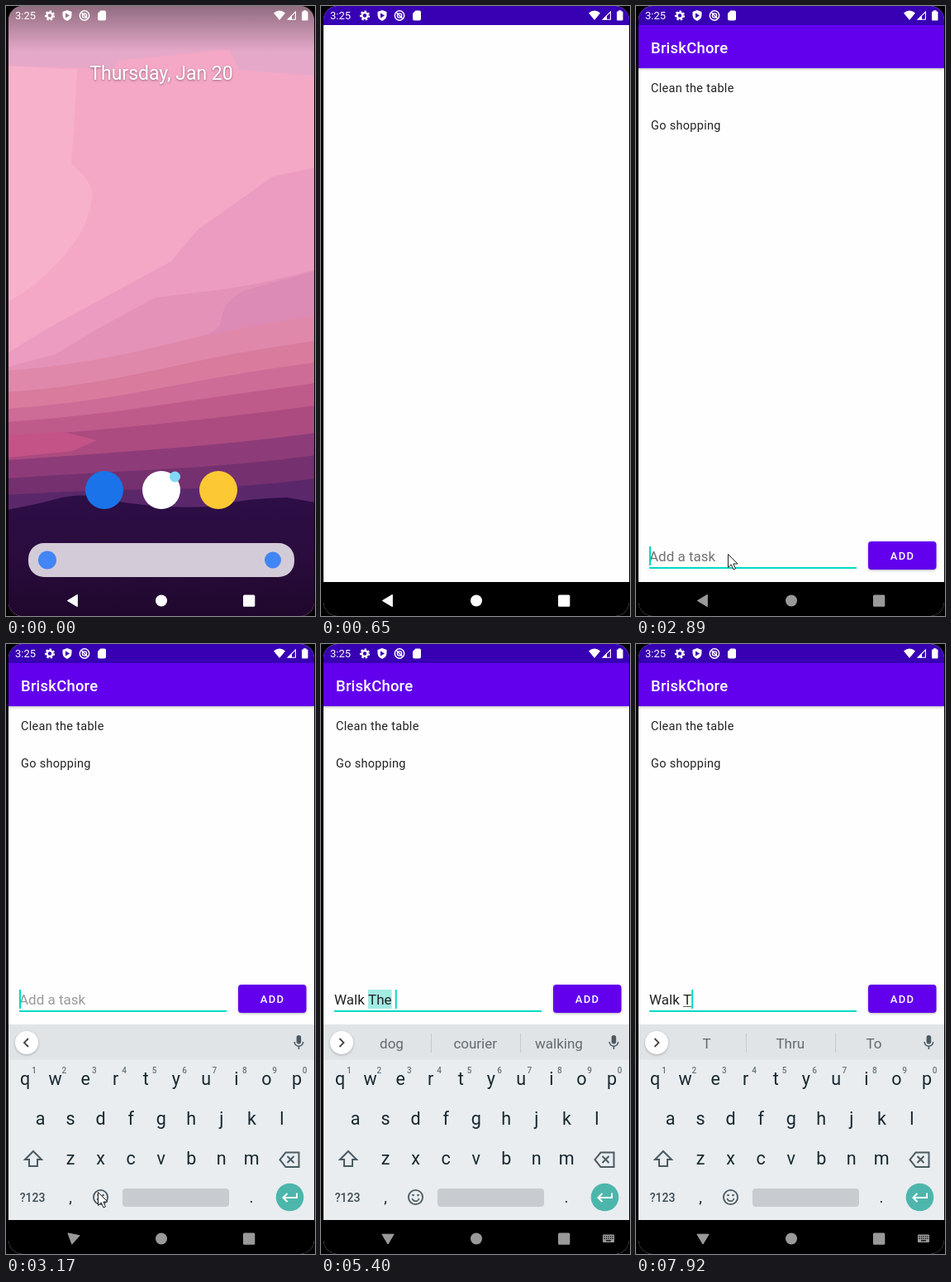
These frames come from a looping animation (374 by 736 pixels, 8000 ms). An HTML page with a canvas:

```html
<!DOCTYPE html>
<html lang="en">
<head>
<meta charset="utf-8">
<title>Task list demo</title>
<style>
html, body { margin: 0; width: 100%; height: 100%; overflow: hidden; background: #000; }
canvas { display: block; width: 374px; height: 736px; }
</style>
</head>
<body>
<canvas id="stage" width="374" height="736"></canvas>
<script>
const c = document.getElementById('stage').getContext('2d');
const LOOP = 8000;
const TEAL = '#03dac5', VIOLET = '#6200ee', INK = '#222', KEY = '#17272f', ICON = '#4b5a62';

// The screen refreshes only at these moments.
const TICKS = [0, 500, 650, 1070, 1370, 1520, 1680, 1840, 2140, 2290, 2440, 2590, 2740, 2890,
  3020, 3170, 3320, 3470, 3930, 4240, 4370, 4950, 5100, 5250, 5400, 5550, 5690, 5840,
  6300, 7020, 7320, 7470, 7620, 7770, 7920];

// time, text in the field, suggestions
const TYPING = [
  [4240, 'Wal', 'Wal,Walk,Wall'],
  [4370, 'Walk', 'Walk,Walking,Walks'],
  [4950, 'Walk ', 'to,the,away'],
  [5100, 'Walk T', 'T,Thru,To'],
  [5250, 'Walk The', 'The,Them,Theater'],
  [5400, 'Walk The ', 'dog,courier,walking'],
  [5690, 'Walk The d', 'd,dog,down'],
  [5840, 'Walk The do', 'do,dog,doing'],
  [7320, 'Walk The d', 'd,dog,down'],
  [7470, 'Walk The ', 'dog,courier,walking'],
  [7620, 'Walk The', 'The,Them,Theater'],
  [7770, 'Walk Th', 'Th,The,Thanks'],
  [7920, 'Walk T', 'T,Thru,To']
];

const clamp = v => Math.max(0, Math.min(1, v));
const phase = (t, a, b) => clamp((t - a) / (b - a));
const easeOut = p => 1 - (1 - p) ** 2;
const within = (t, a, b) => t >= a && t < b;

function rect(x, y, w, h, fill, r = 0) {
  c.fillStyle = fill;
  c.beginPath();
  c.roundRect(x, y, w, h, r);
  c.fill();
}
function disc(x, y, r, fill) {
  c.fillStyle = fill;
  c.beginPath();
  c.arc(x, y, r, 0, 7);
  c.fill();
}
function ring(x, y, r, color, w = 1.6, a = 0, b = 7) {
  c.strokeStyle = color;
  c.lineWidth = w;
  c.beginPath();
  c.arc(x, y, r, a, b);
  c.stroke();
}
function shape(d, fill) {
  c.fillStyle = fill;
  c.fill(new Path2D(d));
}
function line(d, color, w = 2) {
  c.strokeStyle = color;
  c.lineWidth = w;
  c.stroke(new Path2D(d));
}
function text(s, x, y, size, color, { weight = 400, align = 'left', gap = 0 } = {}) {
  c.font = `${weight} ${size}px Roboto, sans-serif`;
  c.letterSpacing = gap + 'px';
  c.textAlign = align;
  c.fillStyle = color;
  c.fillText(s, x, y);
}
function shadow(color, blur, y) {
  c.shadowColor = color;
  c.shadowBlur = blur;
  c.shadowOffsetY = y;
}
const noShadow = () => shadow('transparent', 0, 0);

function fade(y0, y1, ...stops) {
  const g = c.createLinearGradient(0, y0, 0, y1);
  stops.forEach((s, i) => g.addColorStop(i / (stops.length - 1), s));
  return g;
}

function wallpaper() {
  rect(0, 0, 374, 736, '#e5a8c8');
  shape('M0 72L130 76 135 66 270 52 282 77 374 84V736H0Z', '#f4a8c5');
  shape('M0 72L86 77 82 150 79 190 Q108 215 104 232 Q98 275 60 312 Q35 340 0 358Z', '#f8b1cb');
  shape('M0 420L45 392 100 362 200 308 232 270 300 222 322 206 374 195V736H0Z', '#ec9cc0');
  shape('M0 436L60 420 110 390 180 352 262 342 310 334 374 318V736H0Z', '#e592b8');
  shape('M374 320L300 340Q262 350 260 382Q255 396 220 402L374 380Z', '#dc8bb6');
  const bands = [
    [440, 374, '#df88aa'], [466, 404, '#d87b9d'], [486, 430, '#cd6c96'],
    [502, 455, '#bf5b8b'], [520, 482, '#ac4b80'], [548, 515, '#8e3c79'],
    [570, 542, '#75306f'], [590, 570, '#5b276b']
  ];
  for (const [l, r, color] of bands) {
    const m = (l + r) / 2 + 3;
    shape(`M0 ${l}Q90 ${l - 6} 187 ${m}T374 ${r}V736H0Z`, color);
    if (l === 520) shape('M0 518L70 514 110 524 80 537 0 545Z', '#c45388');
  }
  shape('M0 608Q35 602 60 595Q95 585 130 597Q190 607 245 604Q290 594 340 593L374 599V736H0Z',
    fade(590, 736, '#2d0e46', '#2a0c3e', '#1f082c'));
  rect(0, 0, 374, 55, fade(0, 55, 'rgba(60,50,55,.5)', 'rgba(60,50,55,0)'));
}

function home() {
  wallpaper();
  shadow('rgba(60,20,50,.5)', 3, 1);
  text('Thursday, Jan 20', 188, 89, 23, '#fff', { align: 'center' });
  noShadow();
  disc(119, 584, 23, '#1a73e8');
  disc(188, 584, 23, '#fff');
  disc(204.5, 568, 6.5, '#82d8f8');
  disc(257, 584, 23, '#fcc934');
  rect(27, 648, 322, 41, '#d3ccd8', 19);
  disc(50, 668.5, 11, '#4285f4');
  disc(323, 668.5, 10, '#4285f4');
}

function openingWindow() {
  c.globalAlpha = 0.5;
  rect(29, 52, 318, 19, '#3700b3');
  rect(29, 71, 318, 578, '#fff');
  rect(29, 649, 318, 39, '#000');
  c.globalAlpha = 1;
}

function statusBar() {
  const w = '#fff';
  text('3:25', 11, 16.2, 13, w);
  c.setLineDash([2.4, 2.1]);
  ring(53, 11.5, 5, w, 2.2);
  c.setLineDash([]);
  ring(53, 11.5, 3.4, w, 2.4);
  shape('M74 5L79.500 7V11.500Q79 16 74 18Q69 16 68.500 11.500V7ZM72 8.500V14.500L77 11.500Z', w);
  ring(95, 11.5, 5.7, w, 1.5);
  ring(95, 11.5, 2.6, w, 1.4);
  line('M91 7.500L99 15.500', w, 1.4);
  shape('M114.500 5.500H119Q121 5.500 121 7.500V15.500Q121 17.500 119 17.500H113Q111 17.500 111 15.500V9Z', w);
  shape('M324 8.500Q331 2.500 338 8.500L331 17Z', w);
  line('M341 16.300L350.400 7V16.300Z', w, 1.1);
  shape('M341 16.500L346 11.500V16.500Z', w);
  rect(358, 6.5, 7.5, 11, w, 1);
  rect(360, 5.3, 3.5, 2, w);
}

function navBar(color, turn, keys) {
  c.save();
  c.translate(81, 717.5);
  c.rotate(-turn * Math.PI / 2);
  c.lineJoin = 'round';
  shape('M-7 0L5.500 -7.500V7.500Z', color);
  line('M-6.500 0L5.300 -7V7Z', color, 1);
  c.restore();
  disc(188, 717.5, 7, color);
  rect(287, 710.5, 14.3, 14.3, color, 1.5);
  if (!keys) return;
  c.globalAlpha = keys;
  rect(341, 712.5, 14, 9.5, color, 1);
  for (let i = 0; i < 5; i++) {
    rect(342.4 + i * 2.5, 714.2, 1.3, 1.3, '#000');
    rect(342.4 + i * 2.5, 716.7, 1.3, 1.3, '#000');
  }
  rect(345, 719.3, 6, 1.2, '#000');
  c.globalAlpha = 1;
}

function pointer(x, y) {
  c.save();
  c.translate(x + .5, y + .5);
  c.lineJoin = 'miter';
  const d = 'M0 0V16L3.700 12.500L6.500 18.500L9 17.400L6.400 11.500H11.500Z';
  shape(d, '#fff');
  line(d, '#222', 1);
  c.restore();
}

function field(t, entry, dy) {
  const focus = t >= 2740, x = 16, base = 670 + dy;
  const value = entry ? entry[1] : '';
  const size = s => {
    c.font = '400 17px Roboto, sans-serif';
    c.letterSpacing = '0px';
    return c.measureText(s).width;
  };
  if (value) {
    const word = value.trim().split(' ').pop();
    const at = x + size(value.slice(0, value.lastIndexOf(word)));
    const fresh = within(t, 4950, 5100) || within(t, 5400, 5550);
    if (fresh) rect(at, 652 + dy, size(word), 23, '#a2ece4');
    text(value, x, base, 17, INK);
    if (!value.endsWith(' ')) rect(at, 672 + dy, size(word), 1, '#666');
  } else {
    text('Add a task', x, base, 17, t < 3170 ? '#707070' : '#999');
  }
  if (focus) rect(16, 677 + dy, 251, 2, TEAL);
  else rect(16, 677 + dy, 251, 1, '#8a8a8a');
  const blink = within(t, 3470, 3930) || within(t, 6300, 7020);
  if (focus && !blink) rect(x + size(value), 652 + dy, 2, 23, TEAL);
}

function strip(t, entry) {
  rect(0, 459, 374, 42.5, '#e0e4e7');
  shadow('rgba(0,0,0,.25)', 3, 1);
  disc(25, 481, 14, '#fff');
  noShadow();
  line(entry ? 'M22.500 476L27.500 481L22.500 486' : 'M27 476L22 481L27 486', '#444', 1.8);
  if (entry) {
    entry[2].split(',').forEach((s, i) =>
      text(s, 85.5 + i * 101.2, 487.5, 17, '#626a6f', { align: 'center' }));
    rect(133, 470, 1, 23, '#c5cacd');
    rect(241, 470, 1, 23, '#c5cacd');
  } else {
    c.globalAlpha = phase(t, 3170, 3470);
    ring(72.5, 479, 5.2, ICON, 2);
    line('M76 483L82 489', ICON, 2.2);
    c.strokeStyle = ICON;
    c.lineWidth = 1.8;
    c.beginPath();
    c.roundRect(120.5, 473.5, 14, 14, 2);
    c.stroke();
    disc(125, 478.5, 1.1, ICON);
    disc(130, 478.5, 1.1, ICON);
    ring(127.5, 480, 4, ICON, 1.5, .3, 2.8);
    text('GIF', 181, 485.5, 14, ICON, { weight: 700, align: 'center', gap: .4 });
    rect(228, 473, 16, 16, '#66747b', 1);
    rect(268, 470, 1, 21, '#c5cacd');
    for (let i = 0; i < 3; i++) disc(296.3 + i * 5.8, 481, 1.8, ICON);
    c.globalAlpha = 1;
  }
  rect(351.6, 472, 5.6, 10.5, ICON, 2.8);
  ring(354.4, 480, 5.3, ICON, 1.6, 0, Math.PI);
  rect(353.6, 485, 1.6, 4, ICON);
}

function keyRow(keys, x, y) {
  [...keys].forEach((k, i) => text(k, x + i * 36.55, y, 21.5, KEY, { align: 'center' }));
}

function keyboard(t, entry, slide) {
  c.save();
  c.beginPath();
  c.rect(0, 0, 374, 695);
  c.clip();
  c.translate(0, slide);
  rect(0, 459, 374, 240, '#e9edf0');
  strip(t, entry);
  keyRow('qwertyuiop', 23, 532);
  [...'1234567890'].forEach((n, i) =>
    text(n, 34 + i * 36.4, 517.5, 10, '#68747b', { weight: 500, align: 'center' }));
  keyRow('asdfghjkl', 41.5, 580);
  keyRow('zxcvbnm', 78, 627.5);
  line('M33 612L43 622H38V630H28V622H23Z', ICON);
  line('M338.500 613.500H354.500V631H338.500L331.500 622.200ZM340.500 618L348.500 626M348.500 618L340.500 626', ICON);
  text('?123', 32, 672.5, 14, '#3b4a52', { weight: 500, align: 'center' });
  text(',', 78, 674, 19, KEY, { align: 'center' });
  text('.', 297, 674, 19, KEY, { align: 'center' });
  ring(114.5, 667.5, 8.6, ICON, 1.8);
  disc(111.5, 665, 1.3, ICON);
  disc(117.5, 665, 1.3, ICON);
  ring(114.5, 668, 4.2, ICON, 1.6, .2, 2.94);
  rect(141, 657, 129, 22, '#c8ccd0', 4);
  disc(343.5, 667.5, 16.8, '#4db6ac');
  line('M352 662.500V668H335.500M340.500 663L335.500 668L340.500 673', '#fff');
  c.restore();
}

function app(t) {
  rect(0, 0, 374, 736, '#fefefe');
  if (t >= 1370) {
    const entry = TYPING.filter(e => e[0] <= t).pop();
    const up = easeOut(phase(t, 2890, 3170));
    const dy = -235 * up;
    shadow('rgba(0,0,0,.3)', 3, 1);
    rect(0, 23, 374, 52, VIOLET);
    rect(281, 646 + dy, 82.5, 34, VIOLET, 4);
    noShadow();
    text('BriskChore', 18, 56.5, 18.5, '#fff', { weight: 500, gap: .2 });
    text('Clean the table', 18, 104, 14.5, INK, { gap: .3 });
    text('Go shopping', 18, 149, 14.5, INK, { gap: .3 });
    text('ADD', 322.6, 668 + dy, 13, '#fff', { weight: 500, align: 'center', gap: 1.3 });
    field(t, entry, dy);
    if (up > 0) keyboard(t, entry, 236 * (1 - up));
  }
  rect(0, 0, 374, 23, '#3700b3');
  rect(0, 695, 374, 41, '#000');
}

function draw(now) {
  const time = now % LOOP;
  const t = TICKS.filter(k => k <= time).pop();
  rect(0, 0, 374, 736, '#000');
  c.save();
  c.beginPath();
  c.roundRect(3, 0, 370, 736, 17);
  c.clip();
  if (t < 650) {
    home();
    if (t >= 500) openingWindow();
  } else {
    app(t);
  }
  statusBar();
  const grey = Math.round(255 - 102 * phase(t, 1370, 1840));
  navBar(`rgb(${grey},${grey},${grey})`, easeOut(phase(t, 2890, 3320)), phase(t, 3170, 3470));
  if (within(t, 2140, 3320)) {
    const p = easeOut(phase(t, 2090, 2590));
    pointer(Math.round(340 - 229 * p), Math.round(705 - 44 * p));
  }
  c.restore();
}

function loop() {
  draw(performance.now());
  requestAnimationFrame(loop);
}
loop();
</script>
</body>
</html>
```
